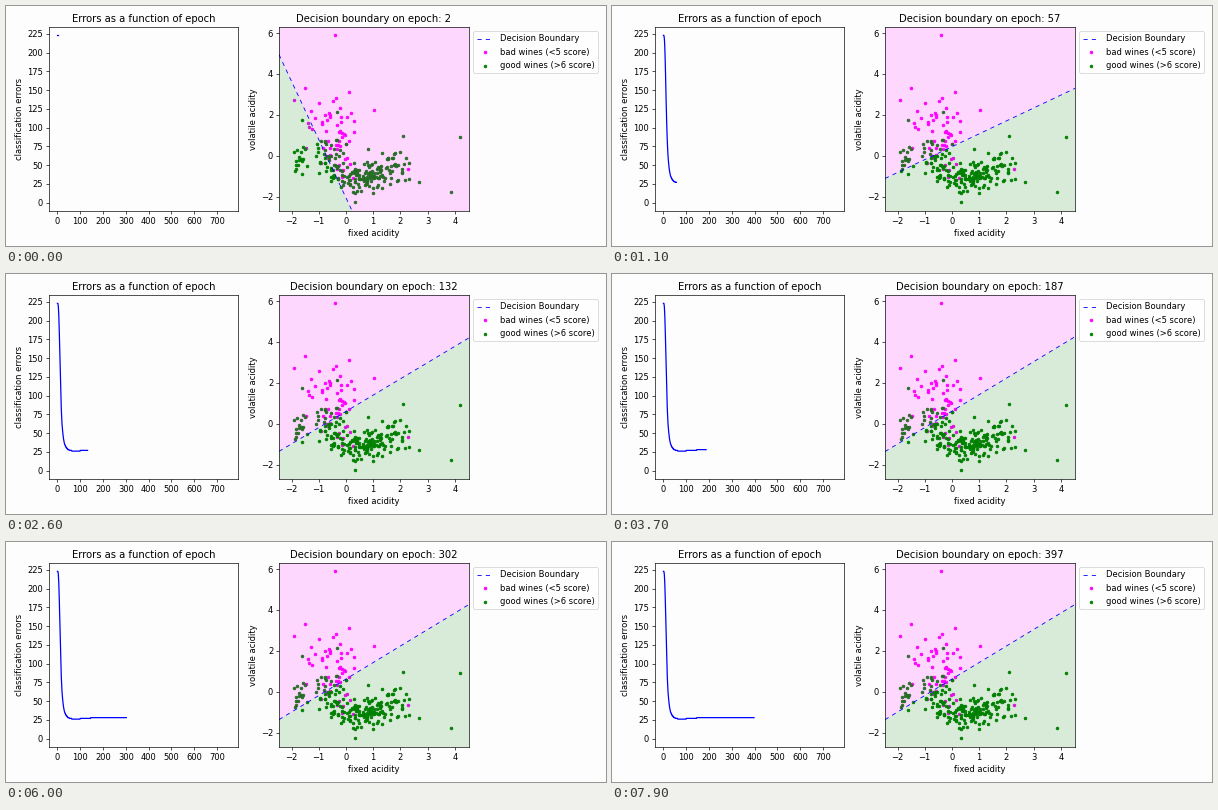
A matplotlib script for the animation above (8000 ms loop, 600 px wide and 240 px high).

```python
import matplotlib.pyplot as plt
import numpy as np
from matplotlib.animation import FuncAnimation
from matplotlib.patches import Polygon

W, H, DPI = 600, 240, 60
FRAMES, INTERVAL = 80, 100
XLIM, YLIM = (-2.46, 4.52), (-2.71, 6.3)
BAD, GOOD, PAPER = "magenta", "green", "#fefdfe"

plt.rcParams["font.family"] = "DejaVu Sans"
rng = np.random.default_rng(11)


def add_axes(left, right, top=21, bottom=205):
    """Axes placed by stage pixels, y counted from the top."""
    return fig.add_axes([left / W, 1 - bottom / H,
                         (right - left) / W, (bottom - top) / H],
                        facecolor=PAPER)


def cloud(n, center, spread):
    """Bell-shaped cloud of n samples without far strays."""
    offsets = rng.normal(size=(8 * n, 2))
    offsets = offsets[np.hypot(*offsets.T) < 2.3][:n]
    return np.array(center) + offsets * spread


def errors_at(epoch):
    """Misclassified wines: a steep fall, then a slight rise to 28."""
    floor = 25.2 + 2.6 * np.clip((epoch - 60) / 100, 0, 1)
    return np.round(floor + 198 / (1 + (epoch / 12.8) ** 3.2))


def settle(epoch, start, end, pace):
    return end + (start - end) * np.exp(-((epoch - 2) / pace) ** 0.741)


def boundary(epoch):
    slope = settle(epoch, -2.85, 0.808, 12.3)
    intercept = settle(epoch, -2.06, 0.618, 14.4)
    return slope * xs + intercept


bad_wines = np.vstack([
    cloud(48, (-0.5, 1.25), (0.5, 1.05)),
    cloud(10, (1.0, -0.1), (1.1, 0.5)),
    [(-0.4, 5.89), (1.03, 2.26), (-1.91, 2.73), (-1.5, 3.33)],
])
good_wines = np.vstack([
    cloud(125, (0.6, -1.05), (0.75, 0.4)),
    cloud(28, (1.7, -0.5), (0.6, 0.5)),
    cloud(16, (-1.75, -0.15), (0.15, 0.4)),
    cloud(36, (-0.65, 0.05), (0.4, 0.45)),
    [(4.19, 0.89), (3.86, -1.76), (2.09, 0.96), (0.33, -2.27),
     (-0.33, 2.16), (-1.6, 1.75)],
])

epochs = np.arange(401)
errors = errors_at(epochs)
xs = np.array(XLIM)

fig = plt.figure(figsize=(W / DPI, H / DPI), dpi=DPI, facecolor=PAPER)

ax_err = add_axes(42.8, 232.3)
ax_err.set(xlim=(-37.8, 792.8), ylim=(-11.15, 234.15),
           xticks=range(0, 800, 100), yticks=range(0, 226, 25),
           title="Errors as a function of epoch",
           ylabel="classification errors")
curve, = ax_err.plot([], [], color="blue", lw=1.5)

ax = add_axes(273, 463)
ax.set(xlim=XLIM, ylim=YLIM, xticks=range(-2, 5), yticks=range(-2, 7, 2),
       xlabel="fixed acidity", ylabel="volatile acidity")
title = ax.set_title("")
line, = ax.plot([], [], color="blue", lw=1, ls=(0, (5, 5)),
                label="Decision Boundary")
ax.scatter(*bad_wines.T, s=10, c=BAD, label="bad wines (<5 score)")
ax.scatter(*good_wines.T, s=10, c=GOOD, label="good wines (>6 score)")
ax.legend(loc="upper left", bbox_to_anchor=(1, 1))


def add_region(color):
    return ax.add_patch(Polygon(np.zeros((4, 2)), facecolor=color, alpha=0.15,
                                lw=0, zorder=1.5))


above, below = add_region(BAD), add_region(GOOD)


def update(i):
    epoch = 2 + 5 * i
    curve.set_data(epochs[:epoch + 1], errors[:epoch + 1])
    ys = boundary(epoch)
    line.set_data(xs, ys)
    for region, edge in ((above, 20), (below, -20)):
        region.set_xy([(xs[0], ys[0]), (xs[1], ys[1]),
                       (xs[1], edge), (xs[0], edge)])
    title.set_text(f"Decision boundary on epoch: {epoch}")
    return curve, line, above, below, title


anim = FuncAnimation(fig, update, frames=FRAMES, interval=INTERVAL,
                     repeat=True, repeat_delay=0, blit=False)
plt.show()
```
